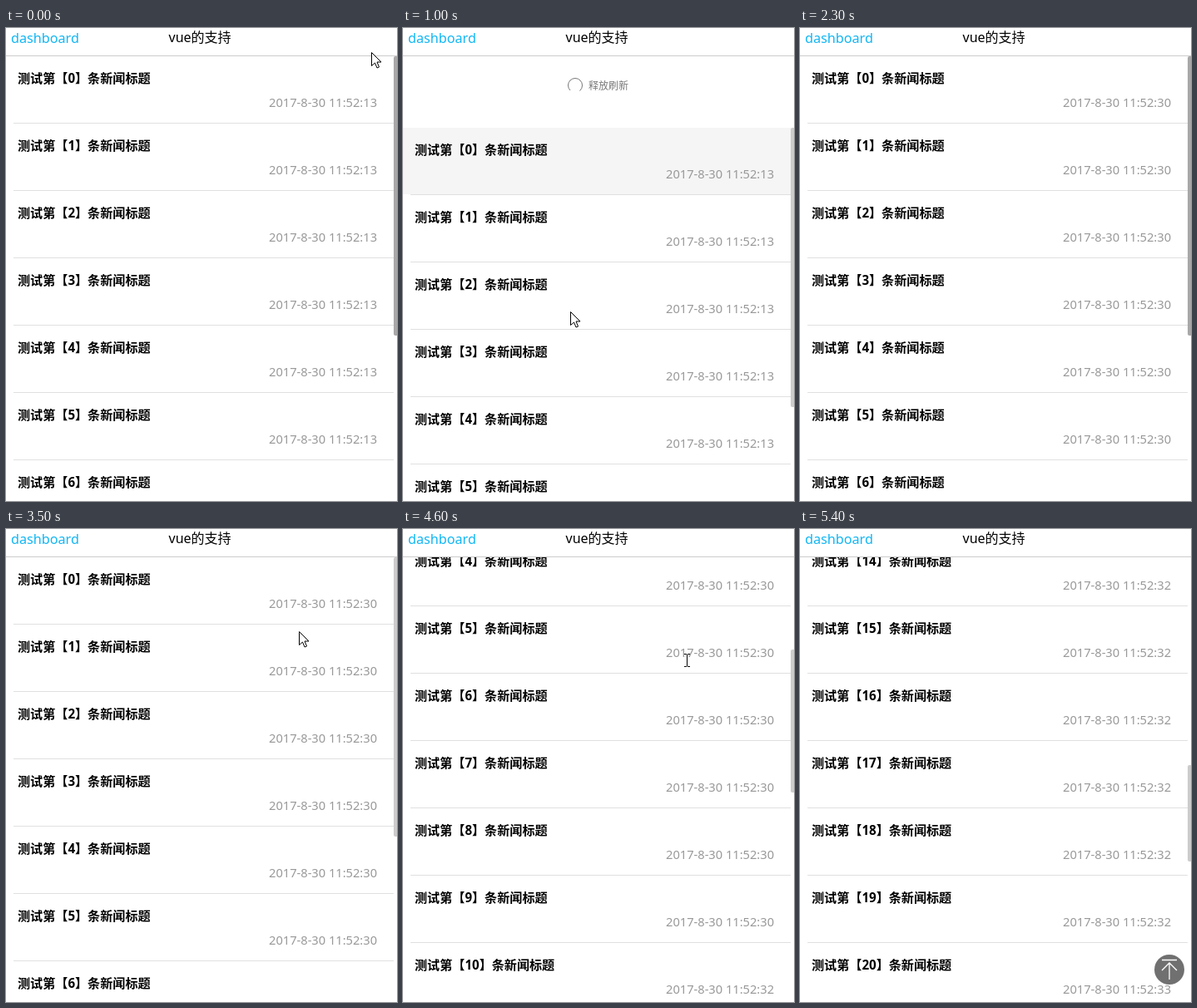
An HTML page with a canvas that plays this animation: 470x569 px, repeating every 5.8 s.

```html
<!DOCTYPE html>
<html lang="zh-CN">
<head>
<meta charset="utf-8">
<title>vue的支持</title>
<style>
html, body { margin: 0; width: 100%; height: 100%; overflow: hidden; background: #fff; }
canvas { display: block; }
</style>
</head>
<body>
<canvas id="stage" width="470" height="569"></canvas>
<script>
const W = 470, H = 569, TOP = 34, ROW = 81, FOOT = 71, PAGE = 10;
const VIEW = H - TOP;
const LOOP = 5800, STEP = 100;
const PRESS = 475, DRAGGED = 1215, RELEASE = 1450, REFRESHED = 1850;
const LEAVE = 2300, RETURN = 3500;
const DAMPING = 0.3, REST = 75;
const FONT = '"Noto Sans", "Noto Sans CJK SC", "Noto Sans CJK", sans-serif';
const ctx = document.getElementById('stage').getContext('2d');

const part = (t, a, b) => Math.min(1, Math.max(0, (t - a) / (b - a)));
const easeOut = (t, a, b) => 1 - (1 - part(t, a, b)) ** 2;
const easeBoth = (t, a, b) => (1 - Math.cos(Math.PI * part(t, a, b))) / 2;
const between = (t, a, b) => t >= a && t < b;

// Each term is one stroke of the hand
function mouseAt(t) {
  const toList = easeOut(t, 0, PRESS), drag = easeOut(t, PRESS, DRAGGED);
  const leave = easeOut(t, REFRESHED, LEAVE), back = easeOut(t, LEAVE, RETURN);
  const settle = easeOut(t, RETURN, 4000);
  return {
    x: 439 - 218 * toList - 22 * drag + 276 * leave - 123 * back - 11 * settle,
    y: 29 + 25 * toList + 313 * drag - 67 * leave - 177 * back + 35 * settle
  };
}

function pullAt(t) {
  const max = DAMPING * 313;
  const dragged = max * easeOut(t, PRESS, DRAGGED);
  const bounce = (max - REST) * easeOut(t, RELEASE, RELEASE + 250);
  return Math.round(dragged - bounce - REST * easeOut(t, REFRESHED, REFRESHED + 400));
}

// Each stroke ends at the bottom of the loaded rows
function scrollAt(t) {
  const firstEnd = PAGE * ROW + FOOT - VIEW;
  return Math.round(firstEnd * easeBoth(t, RETURN, 4200) + PAGE * ROW * easeBoth(t, 4500, 5200));
}

function text(str, x, y, size, color, weight = 400, align = 'left') {
  ctx.font = `${weight} ${size}px ${FONT}`;
  ctx.fillStyle = color;
  ctx.textAlign = align;
  ctx.fillText(str, x, y);
}

function rect(x, y, w, h, color) {
  ctx.fillStyle = color;
  ctx.fillRect(x, y, w, h);
}

function stroke(color, width = 1) {
  ctx.strokeStyle = color;
  ctx.lineWidth = width;
  ctx.stroke();
}

// Open ring with its label; gap is the direction of the opening in degrees
function tip(y, gap, label) {
  const rad = Math.PI / 180;
  ctx.beginPath();
  ctx.arc(207, y, 8.5, (gap + 42) * rad, (gap + 318) * rad);
  stroke('#777');
  text(label, 223, y + 5, 12, '#777');
}

function pullTip(t, pull) {
  if (pull <= 0) return;
  const loading = t > RELEASE;
  const gap = loading ? 205 + (t - 1500) * 0.6 : 225 + (pull - 29) * 4;
  tip(69, gap, loading ? '加载中...' : pull < REST ? '下拉刷新' : '释放刷新');
}

function rows(t, top, count) {
  const seconds = [t < REFRESHED ? 13 : 30, 32, 33];
  rect(0, top, W, H, '#fff');
  if (between(t, PRESS, RELEASE)) rect(0, top, 466, ROW - 1, '#f5f5f5');
  for (let i = 0; i < count; i++) {
    const y = top + i * ROW;
    if (y + ROW < TOP || y > H) continue;
    text(`测试第【${i}】条新闻标题`, 14, y + 32, 15.1, '#000', 700);
    text(`2017-8-30 11:52:${seconds[Math.floor(i / PAGE)]}`, 446, y + 61, 14.65, '#999', 400, 'right');
    rect(9, y + ROW - 1, 457, 1, '#e0e0e0');
  }
  const end = top + count * ROW;
  if (end < H) tip(end + FOOT / 2, 205 + t * 0.6, '加载中...');
}

function scrollbar(t, pull, scroll, count) {
  const ratio = VIEW / (count * ROW + 42);
  const outside = t < STEP || between(t, LEAVE, RETURN);
  ctx.beginPath();
  ctx.roundRect(466, Math.round(TOP + pull + scroll * ratio), 5, Math.round(VIEW * ratio), 2);
  ctx.fillStyle = outside ? '#a8a8a8' : '#ccc';
  ctx.fill();
}

function topButton(x, y) {
  ctx.beginPath();
  ctx.arc(x, y, 18, 0, 7);
  ctx.fillStyle = '#707070';
  ctx.fill();
  ctx.beginPath();
  ctx.moveTo(x - 9, y - 11.5);
  ctx.lineTo(x + 9, y - 11.5);
  ctx.moveTo(x, y - 8);
  ctx.lineTo(x, y + 12);
  ctx.moveTo(x - 9, y + 1);
  ctx.lineTo(x, y - 8);
  ctx.lineTo(x + 9, y + 1);
  stroke('#fff', 1.3);
}

function header() {
  rect(0, 0, W, 33, '#fff');
  rect(0, 33, W, 1, '#ccc');
  text('dashboard', 6, 18, 16.2, '#12b7f5');
  text('vue的支持', 195.5, 17, 16, '#000');
}

function arrow(x, y) {
  const outline = 'l0 16 l4 -3.5 l2.5 6 l2.5 -1 l-2.5 -6 l5 0 z';
  const shape = new Path2D(`M${x + 0.5} ${y + 0.5} ${outline}`);
  ctx.fillStyle = '#fff';
  ctx.fill(shape);
  ctx.strokeStyle = '#000';
  ctx.lineWidth = 1;
  ctx.stroke(shape);
}

function beam(x, y) {
  rect(x, y - 7, 1, 14, '#000');
  for (const edge of [y - 8, y + 7]) {
    rect(x - 3, edge, 3, 1, '#000');
    rect(x + 1, edge, 3, 1, '#000');
  }
}

function mouse(t) {
  if (between(t, LEAVE, RETURN) || t >= 5400) return;
  const { x, y } = mouseAt(t);
  const cursor = t >= 4600 ? beam : arrow;
  cursor(Math.round(x), Math.round(y));
}

function draw(t) {
  const pull = pullAt(t);
  // the second stroke starts once the next page is in
  const scroll = t <= 4600 ? Math.min(scrollAt(t), PAGE * ROW + FOOT - VIEW) : scrollAt(t);
  const count = PAGE * (t < 4400 ? 1 : t < 5400 ? 2 : 3);
  rect(0, 0, W, H, '#fff');
  pullTip(t, pull);
  rows(t, TOP + pull - scroll, count);
  scrollbar(t, pull, scroll, count);
  if (scroll > 500) topButton(444, 530);
  header();
  mouse(t);
}

const start = performance.now();
function tick() {
  const t = (performance.now() - start) % LOOP;
  draw(Math.floor(t / STEP) * STEP);
  requestAnimationFrame(tick);
}
tick();
</script>
</body>
</html>
```
